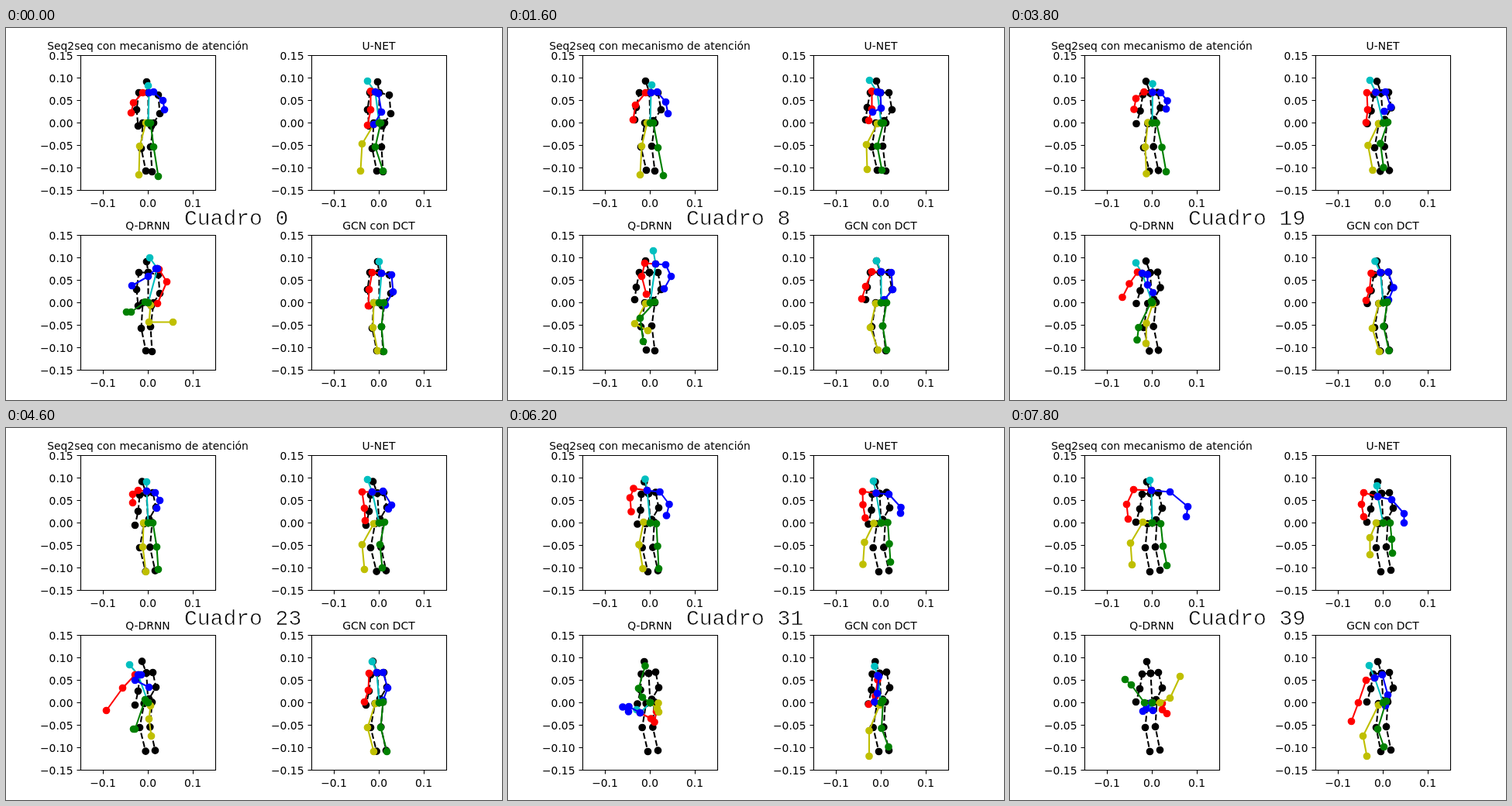
An HTML page that plays this animation: 640x480 px, repeating every 8 s.

```html
<!DOCTYPE html>
<html lang="es">
<head>
<meta charset="utf-8">
<title>Cuadro</title>
<style>
html, body { margin: 0; width: 100%; height: 100%; overflow: hidden; background: #fff; }
svg { display: block; width: 640px; height: 480px; }
text { font: 13.89px "DejaVu Sans", sans-serif; }
.mid { text-anchor: middle; }
.end { text-anchor: end; }
.axes { fill: none; stroke: #000; stroke-width: 1.1; }
.line { fill: none; stroke-width: 2.08; stroke-linejoin: round; }
.dots { fill: none; stroke-width: 9.7; stroke-linecap: round; }
#count { font: 28px "Courier New", "Liberation Mono", monospace; stroke: #fff; stroke-width: .7; }
</style>
</head>
<body>
<svg id="stage" viewBox="0 0 640 480"><text id="count" x="230" y="254" xml:space="preserve"></text></svg>
<script>
const STEP = 200, STEPS = 40;
const stage = document.getElementById('stage');
const count = document.getElementById('count');

// Key poses: step -> x,y offsets in px from the hip centre.
// Spine is neck, head; arms and legs run from the body outwards.
const truth = {
  spine: {0: [0,-39,-2,-53], 8: [-1,-39,-6,-54], 15: [-3,-39,-8,-54], 27: [-2,-38,-8,-53], 39: [-2,-38,-7,-53]},
  armR: {0: [-12,-39,-15,-17,-13,4], 8: [-14,-39,-18,-20,-20,-4], 15: [-13,-37,-18,-16,-24,-1],
    23: [-11,-36,-13,-15,-17,3], 27: [-11,-37,-11,-16,-15,3], 35: [-12,-37,-14,-17,-18,0], 39: [-13,-37,-16,-18,-21,-1]},
  legR: {0: [-7,0,-9,33,-3,62], 8: [-7,0,-12,31,-5,61], 15: [-6,1,-11,32,-4,62], 27: [-5,1,-11,32,-3,63], 39: [-6,1,-9,32,-3,63]},
  armL: {0: [13,-36,15,-12,4,4], 8: [10,-39,14,-17,4,-3], 15: [8,-40,11,-19,3,-4],
    23: [6,-39,10,-20,1,-5], 27: [6,-40,10,-20,1,-5], 35: [8,-39,12,-19,3,-4], 39: [8,-39,13,-19,5,-4]},
  legL: {0: [7,0,3,31,5,63], 8: [6,0,2,30,6,62], 15: [5,0,1,30,7,61], 27: [5,-1,3,32,10,62], 39: [6,-1,4,31,10,61]}
};

const seq = {
  spine: {0: [1,-39,0,-48], 8: [1,-39,2,-49], 15: [3,-38,3,-48], 23: [-2,-41,-2,-53], 27: [-4,-41,-5,-55], 35: [-4,-43,-8,-58], 39: [-1,-42,-3,-55]},
  armR: {0: [-7,-39,-19,-26,-22,-13], 8: [-6,-39,-19,-23,-22,-4], 15: [-8,-38,-22,-26,-27,-9],
    23: [-13,-42,-20,-37,-20,-26], 27: [-19,-44,-23,-35,-21,-19], 35: [-24,-45,-29,-30,-28,-10], 39: [-24,-43,-33,-24,-31,-5]},
  legR: {0: [-3,0,-11,30,-12,67], 8: [-4,0,-11,30,-13,67], 15: [-5,-1,-11,31,-12,68],
    23: [-6,0,-7,31,-3,63], 27: [-7,-1,-7,30,-1,61], 35: [-10,-1,-22,26,-18,57], 39: [-12,-1,-28,26,-26,54]},
  armL: {0: [7,-40,19,-29,21,-17], 8: [9,-40,20,-27,23,-12], 15: [13,-39,24,-28,25,-17],
    23: [9,-39,15,-29,11,-19], 27: [9,-39,15,-25,11,-11], 35: [16,-41,34,-23,31,-8], 39: [23,-40,46,-21,44,-8]},
  legL: {0: [3,0,7,31,13,69], 8: [4,0,10,32,17,68], 15: [5,0,14,32,23,66],
    23: [6,0,11,31,13,60], 27: [7,1,9,31,7,60], 35: [9,1,10,29,15,58], 39: [11,1,14,30,19,55]}
};

const unet = {
  spine: {0: [-5,-40,-15,-54], 8: [-5,-40,-15,-55], 15: [-10,-39,-19,-54], 23: [-9,-40,-15,-56], 27: [-7,-41,-12,-57], 35: [-6,-36,-8,-51], 39: [-7,-34,-8,-48]},
  armR: {0: [-11,-41,-11,-17,-15,3], 8: [-12,-41,-12,-18,-16,-3], 15: [-20,-38,-21,-15,-26,2],
    23: [-22,-40,-19,-19,-18,-3], 27: [-23,-41,-20,-22,-17,-6], 35: [-25,-40,-27,-25,-24,-7], 39: [-25,-39,-28,-24,-25,-8]},
  legR: {0: [-7,2,-22,27,-24,62], 8: [-5,1,-19,28,-18,60], 15: [-5,1,-17,30,-8,62],
    23: [-7,1,-22,28,-19,60], 27: [-9,1,-23,28,-25,59], 35: [-10,0,-20,22,-22,48], 39: [-9,0,-17,19,-17,41]},
  armL: {0: [-1,-38,3,-14,-7,2], 8: [-1,-39,0,-19,-11,-14], 15: [1,-39,4,-18,-9,-12],
    23: [5,-41,16,-23,12,-18], 27: [8,-41,23,-25,22,-20], 35: [12,-33,28,-15,28,-5], 39: [11,-30,27,-12,27,0]},
  legL: {0: [2,0,-5,31,5,62], 8: [3,0,-5,30,1,61], 15: [5,-1,-8,25,-3,57],
    23: [7,-1,1,28,4,58], 27: [8,-1,8,29,10,56], 35: [9,0,13,25,14,45], 39: [9,0,11,21,12,39]}
};

const qdrnn = {
  spine: {0: [12,-44,2,-58], 8: [7,-50,4,-67], 15: [-13,-40,-18,-54], 23: [-13,-36,-24,-49], 27: [-14,0,-20,-7], 35: [-12,26,-15,25], 39: [-1,0,-5,3]},
  armR: {0: [14,-43,24,-27,12,1], 8: [-7,-51,-11,-34,-5,-11], 15: [-21,-43,-26,-30,-23,-24],
    23: [-17,-36,-33,-19,-54,10], 27: [-4,7,-9,17,0,22], 35: [6,34,20,33,16,1], 39: [13,1,13,9,19,14]},
  legR: {0: [3,3,1,25,32,25], 8: [-6,1,-20,27,-3,36], 15: [-2,0,-16,32,-20,62],
    23: [3,4,1,21,4,43], 27: [7,11,1,17,-11,13], 35: [11,4,21,7,32,-12], 39: [10,0,23,-6,36,-34]},
  armL: {0: [10,-44,0,-34,-21,-22], 8: [20,-49,27,-34,18,-18], 15: [-3,-37,5,-17,1,-6],
    23: [-9,-36,-17,-29,1,-20], 27: [-25,-8,-27,11,-51,2], 35: [-30,18,-29,12,-20,9], 39: [-8,8,-12,11,1,10]},
  legL: {0: [-4,-1,-22,12,-28,12], 8: [6,-1,-13,20,-9,50], 15: [2,0,-18,30,-20,62],
    23: [-4,-4,-17,34,-19,34], 27: [-8,-10,2,-24,22,-63], 35: [-12,-4,-32,-13,-35,-32], 39: [-10,0,-27,-23,-35,-30]}
};

const gcn = {
  spine: {0: [3,-38,0,-53], 8: [0,-40,-6,-54], 15: [-4,-39,-12,-54], 23: [-3,-39,-9,-53], 27: [-1,-35,-5,-50], 35: [-8,-35,-12,-44], 39: [-11,-32,-18,-48]},
  armR: {0: [-9,-39,-13,-17,-14,4], 8: [-12,-40,-20,-21,-25,-5], 15: [-18,-38,-21,-17,-25,-5],
    23: [-13,-38,-14,-16,-19,-1], 27: [-3,-34,-2,-13,-7,0], 35: [-6,-25,-13,-4,-25,4], 39: [-22,-29,-32,0,-41,24]},
  legR: {0: [-7,0,-8,32,-2,62], 8: [-7,1,-14,32,-4,61], 15: [-6,1,-13,34,-3,63],
    23: [-5,1,-15,32,-7,63], 27: [-4,1,-10,33,-8,66], 35: [0,5,-21,39,-23,72], 39: [-6,3,-26,43,-21,69]},
  armL: {0: [16,-36,18,-14,8,3], 8: [13,-39,15,-17,4,-4], 15: [8,-40,16,-20,9,-4],
    23: [5,-39,11,-19,5,-3], 27: [1,-37,-1,-12,-8,1], 35: [-7,-31,-9,-12,-9,-3], 39: [-1,-36,6,-10,3,4]},
  legL: {0: [6,0,3,31,6,63], 8: [7,0,2,30,7,61], 15: [6,-1,-1,29,5,61],
    23: [5,-1,2,32,10,63], 27: [4,-1,6,33,16,60], 35: [1,-5,-5,33,3,54], 39: [4,-2,-7,34,1,57]}
};

// In drawing order
const limbs = {spine: '#00bfbf', armR: '#f00', legR: '#bfbf00', armL: '#00f', legL: '#008000'};

function add(parent, tag, attrs, text) {
  const node = document.createElementNS('http://www.w3.org/2000/svg', tag);
  for (const key in attrs) node.setAttribute(key, attrs[key]);
  if (text !== undefined) node.textContent = text;
  return parent.appendChild(node);
}

function pose(track, step) {
  const keys = Object.keys(track).map(Number);
  let i = 0;
  while (i < keys.length - 2 && keys[i + 1] <= step) i++;
  const a = track[keys[i]], b = track[keys[i + 1]];
  const k = (step - keys[i]) / (keys[i + 1] - keys[i]);
  return a.map((v, n) => v + (b[n] - v) * k);
}

function figure(panel, tracks, dashed) {
  const parts = Object.keys(limbs).map(name => {
    const stroke = dashed ? '#000' : limbs[name];
    const line = add(panel, 'path', {class: 'line', stroke});
    if (dashed) line.setAttribute('stroke-dasharray', '7.7 3.33');
    return {name, line, dots: add(panel, 'path', {class: 'dots', stroke})};
  });
  return step => {
    const neck = pose(tracks.spine, step).slice(0, 2);
    for (const {name, line, dots} of parts) {
      const start = name.startsWith('arm') ? neck : [0, 0];
      const flat = [...start, ...pose(tracks[name], step)];
      const points = [];
      for (let i = 0; i < flat.length; i += 2) points.push(flat[i].toFixed(2) + ' ' + flat[i + 1].toFixed(2));
      line.setAttribute('d', 'M' + points.join('L'));
      dots.setAttribute('d', points.map(p => `M${p}h0`).join(''));
    }
  };
}

function chart(x, y, title, tracks) {
  const panel = add(stage, 'g', {transform: `translate(${x + .5} ${y + .5})`});
  const label = v => v.toFixed(v * 100 % 10 ? 2 : 1);
  let ticks = 'M-87 -87h174v174h-174z';
  for (let i = -1; i <= 1; i++) {
    ticks += `M${i * 58} 87v5`;
    add(panel, 'text', {class: 'mid', x: i * 58 - .5, y: 108}, (i / 10).toFixed(1).replace('-', '\u2212'));
  }
  for (let i = -3; i <= 3; i++) {
    ticks += `M-87 ${-i * 29}h-5`;
    add(panel, 'text', {class: 'end', x: -97, y: 5 - i * 29}, (i / 20).toFixed(2).replace('-', '\u2212'));
  }
  add(panel, 'text', {class: 'mid', x: -.5, y: -95}, title);
  const figures = [figure(panel, truth, true), figure(panel, tracks, false)];
  add(panel, 'path', {class: 'axes', d: ticks});
  return step => figures.forEach(f => f(step));
}

const charts = [
  chart(183, 122, 'Seq2seq con mecanismo de atención', seq),
  chart(481, 122, 'U-NET', unet),
  chart(183, 354, 'Q-DRNN', qdrnn),
  chart(481, 354, 'GCN con DCT', gcn)
];
stage.append(count);

let shown = -1;
function draw(step) {
  if (step === shown) return;
  shown = step;
  count.textContent = 'Cuadro ' + step;
  charts.forEach(c => c(step));
}

const begin = performance.now();
function tick() {
  draw(Math.floor((performance.now() - begin) / STEP) % STEPS);
  requestAnimationFrame(tick);
}
draw(0);
requestAnimationFrame(tick);
</script>
</body>
</html>
```
